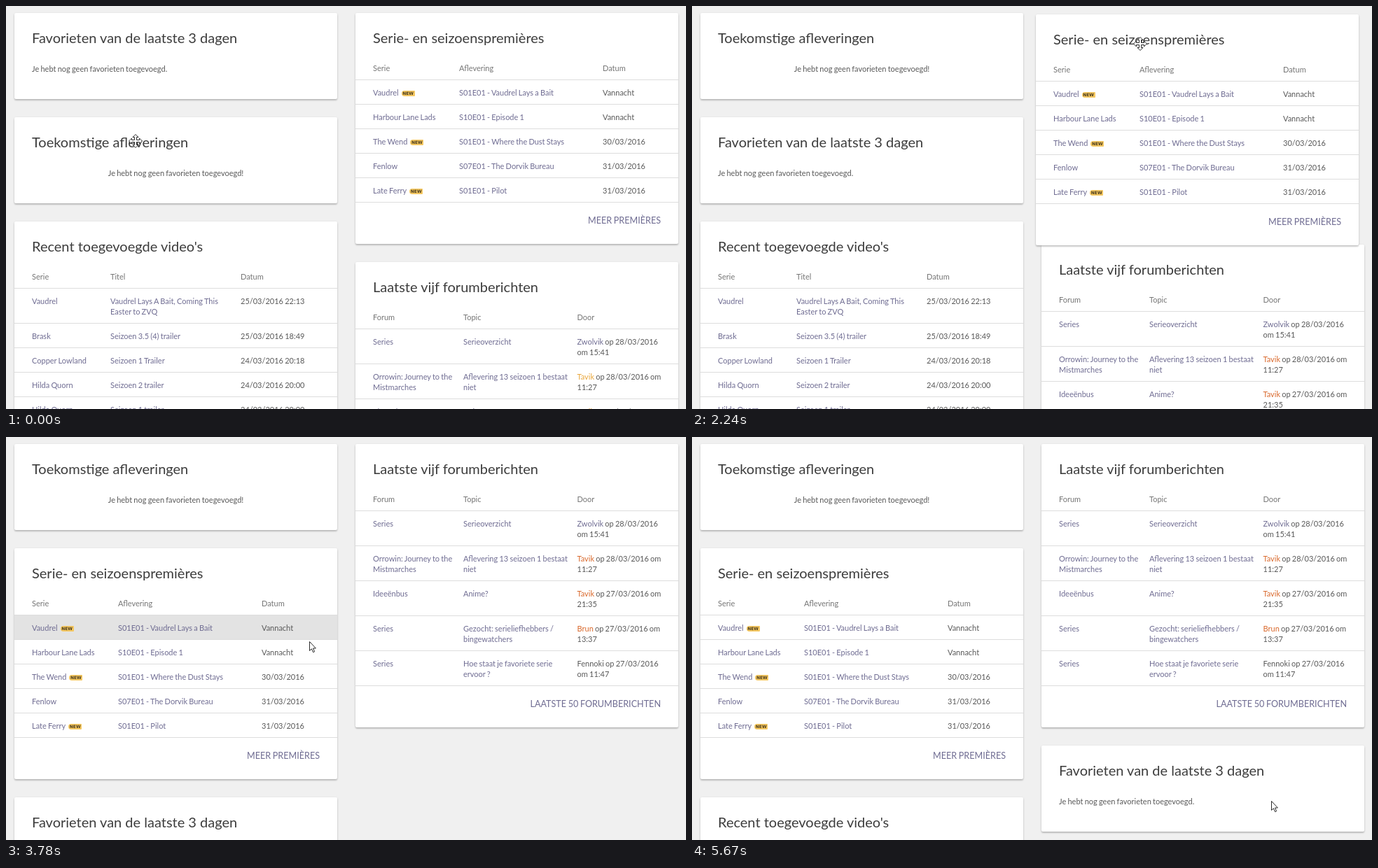
An HTML page that plays this animation: 971x576 px, repeating every 5740 ms.

```html
<!DOCTYPE html>
<html lang="nl">
<head>
<meta charset="utf-8">
<title>Widgets verslepen</title>
<style>
  html, body { margin: 0; width: 100%; height: 100%; overflow: hidden; background: #f0f0f0; }
  #stage {
    position: relative; width: 971px; height: 576px; overflow: hidden;
    font: 11px/15px Lato, sans-serif; word-spacing: -.6px; color: #595959; white-space: nowrap;
  }
  .card {
    position: absolute; left: 0; top: 0; width: 461px; box-sizing: border-box;
    background: #fff; border-radius: 2px;
    box-shadow: 0 1px 3px rgba(0,0,0,.17), 0 2px 2px rgba(0,0,0,.13);
  }
  .card.dragged { z-index: 1; }
  h2 {
    position: absolute; left: 25px; right: 25px; top: 23px; margin: 0;
    font-size: 20px; line-height: 24px; font-weight: 400; word-spacing: 0; color: #3d3d3d;
  }
  p { position: absolute; left: 25px; right: 25px; top: 72px; margin: 0; }
  p.center { text-align: center; }
  .table { padding-top: 71px; }
  .row, .head { display: grid; grid-template-columns: var(--cols); padding-left: 25px; }
  .head { height: 24px; color: #757575; }
  .row { padding-top: 10px; padding-bottom: 9px; border-top: 1px solid #ddd; }
  .row.hover { background: #e3e3e3; }
  .more {
    border-top: 1px solid #ddd; padding: 16px 25px 0; text-align: right;
    font-size: 12.6px; line-height: 19px;
  }
  a, .more { color: #6f6c92; }
  b { font-weight: 400; color: var(--accent); }
  i {
    display: inline-block; width: 19px; height: 8px; margin-left: 4px; vertical-align: 1px;
    background: #f5c862; border-radius: 4px 1px 1px 4px; color: #4a3b1c; text-align: center;
    font: bold 6px/8px "DejaVu Sans", sans-serif;
  }
  svg { position: absolute; left: 0; top: 0; z-index: 2; overflow: visible; }
  svg path { fill: #fff; stroke: #2b2b2b; stroke-width: 1; }
</style>
</head>
<body>
<div id="stage">
  <svg id="cursor" width="1" height="1">
    <path id="grip" d="M0-9.5 4-5.5H1.5V-1.5H5.5V-4L9.5 0 5.5 4V1.5H1.5V5.5H4L0 9.5-4 5.5H-1.5V1.5H-5.5V4L-9.5 0-5.5-4V-1.5H-1.5V-5.5H-4Z"/>
    <path id="arrow" d="M.5.5V13.5L3.4 10.8 5.6 15.7 7.6 14.8 5.5 10H9.4Z"/>
  </svg>
</div>
<script>
const byId = id => document.getElementById(id);
const stage = byId('stage'), cursor = byId('cursor'), grip = byId('grip'), arrow = byId('arrow');

const LOOP = 5740, TICK = 70;
const LAG = TICK / 2; // the page trails the pointer by this much
const GAP = 26, TOP = 10, COLUMN_X = [12, 499];

const link = text => `<a>${text}</a>`;
const fresh = text => link(text) + '<i>NEW</i>';

function addCard(height, title, body) {
  const el = document.createElement('section');
  el.className = 'card';
  el.style.height = height + 'px';
  el.innerHTML = `<h2>${title}</h2>${body}`;
  stage.append(el);
  return { el, height };
}

function table(cols, head, rows, more) {
  const line = (kind, cells) =>
    `<div class="${kind}">${cells.map(c => `<span>${c}</span>`).join('')}</div>`;
  return `<div class="table" style="--cols:${cols}">${line('head', head)}` +
    rows.map(r => line('row', r)).join('') +
    (more ? `<div class="more">${more}</div>` : '') + '</div>';
}

const premiere = (name, episode, date) => [name, link(episode), date];
const video = (name, title, date) => [link(name), link(title), date];
const post = (forum, topic, by) => [link(forum), link(topic), by];

const cards = {
  favourites: addCard(123, 'Favorieten van de laatste 3 dagen',
    '<p>Je hebt nog geen favorieten toegevoegd.</p>'),
  upcoming: addCard(123, 'Toekomstige afleveringen',
    '<p class="center">Je hebt nog geen favorieten toegevoegd!</p>'),
  videos: addCard(405, "Recent toegevoegde video's",
    table('112px 186px 1fr', ['Serie', 'Titel', 'Datum'], [
      video('Vaudrel', 'Vaudrel Lays A Bait, Coming This<br>Easter to ZVQ', '25/03/2016 22:13'),
      video('Brask', 'Seizoen 3.5 (4) trailer', '25/03/2016 18:49'),
      video('Copper Lowland', 'Seizoen 1 Trailer', '24/03/2016 20:18'),
      video('Hilda Quorn', 'Seizoen 2 trailer', '24/03/2016 20:00'),
      video('Hilda Quorn', 'Seizoen 1 trailer', '24/03/2016 20:00'),
      ['&nbsp;']
    ])),
  premieres: addCard(330, 'Serie- en seizoenspremières',
    table('123px 205px 1fr', ['Serie', 'Aflevering', 'Datum'], [
      premiere(fresh('Vaudrel'), 'S01E01 - Vaudrel Lays a Bait', 'Vannacht'),
      premiere(link('Harbour Lane Lads'), 'S10E01 - Episode 1', 'Vannacht'),
      premiere(fresh('The Wend'), 'S01E01 - Where the Dust Stays', '30/03/2016'),
      premiere(link('Fenlow'), 'S07E01 - The Dorvik Bureau', '31/03/2016'),
      premiere(fresh('Late Ferry'), 'S01E01 - Pilot', '31/03/2016')
    ], 'MEER PREMIÈRES')),
  forum: addCard(405, 'Laatste vijf forumberichten',
    table('129px 162.5px 1fr', ['Forum', 'Topic', 'Door'], [
      post('Series', 'Serieoverzicht', link('Zwolvik') + ' op 28/03/2016<br>om 15:41'),
      post('Orrowin: Journey to the<br>Mistmarches', 'Aflevering 13 seizoen 1 bestaat<br>niet',
        '<b>Tavik</b> op 28/03/2016 om<br>11:27'),
      post('Ideeënbus', 'Anime?', '<b>Tavik</b> op 27/03/2016 om<br>21:35'),
      post('Series', 'Gezocht: serieliefhebbers /<br>bingewatchers',
        '<b>Brun</b> op 27/03/2016 om<br>13:37'),
      post('Series', 'Hoe staat je favoriete serie<br>ervoor ?', 'Fennoki op 27/03/2016<br>om 11:47')
    ], 'LAATSTE 50 FORUMBERICHTEN'))
};
const rows = [...stage.querySelectorAll('.row')];
const titles = [...stage.querySelectorAll('h2')];

// Each drag goes from its slot past one point to its new slot;
// afterwards the free pointer glides to the listed stops.
const drags = [
  { card: 'upcoming', column: 0, index: 0, hold: [173, 34], via: [22, 10],
    start: 385, reach: 1120, swap: 1260, drop: 1540,
    stops: [{ leave: 1540, arrive: 2030, at: [671, 45] }] },
  { card: 'premieres', column: 0, index: 1, hold: [172, 35], via: [143, 112],
    start: 2205, reach: 2590, swap: 2450, drop: 2940,
    stops: [{ leave: 2940, arrive: 3220, at: [545, 140] },
            { leave: 3535, arrive: 4130, at: [242, 553] }] },
  { card: 'favourites', column: 1, index: 1, hold: [230, 38], via: [392, 434],
    start: 4165, reach: 4760, swap: 4550, drop: 5110,
    stops: [{ leave: 5110, arrive: 5390, at: [688, 484] },
            { leave: 5495, arrive: 5670, at: [827, 520] }] }
];

const add = (a, b) => a.map((v, i) => v + b[i]);
const mix = (a, b, k) => a.map((v, i) => v + (b[i] - v) * k);
function ease(from, to, t) {
  const k = Math.min(1, Math.max(0, (t - from) / (to - from)));
  return k * k * (3 - 2 * k);
}

function columnsAt(t) {
  const columns = [['favourites', 'upcoming', 'videos'], ['premieres', 'forum']];
  for (const d of drags.filter(d => d.swap <= t)) {
    for (const names of columns) {
      if (names.includes(d.card)) names.splice(names.indexOf(d.card), 1);
    }
    columns[d.column].splice(d.index, 0, d.card);
  }
  return columns;
}

// The placeholder of a dragged card has almost no margin.
function slotsAt(t, dragged) {
  const slots = {};
  columnsAt(t).forEach((names, column) => {
    let y = TOP;
    for (const name of names) {
      slots[name] = [COLUMN_X[column], y];
      y += cards[name].height + (name === dragged ? 1 : GAP);
    }
  });
  return slots;
}

for (const d of drags) {
  d.home = slotsAt(d.start)[d.card];
  d.target = slotsAt(d.drop)[d.card];
}

const dragged = (d, t) =>
  mix(mix(d.home, d.via, ease(d.start, d.reach, t)), d.target, ease(d.reach + TICK, d.drop, t));

function pointerAt(t) {
  let pos = add(drags[0].home, drags[0].hold);
  for (const d of drags) {
    if (t < d.start) break;
    pos = add(dragged(d, t + LAG), d.hold);
    for (const s of d.stops) pos = mix(pos, s.at, ease(s.leave, s.arrive, t));
  }
  return pos;
}

function place(el, [x, y]) {
  el.style.transform = `translate(${Math.round(x)}px,${Math.round(y)}px)`;
}

function contains(el, [x, y]) {
  const r = el.getBoundingClientRect();
  return x >= r.left && x < r.right && y >= r.top && y < r.bottom;
}

function draw(t) {
  const drag = drags.find(d => t >= d.start && t < d.drop);
  const slots = slotsAt(t, drag?.card);
  for (const [name, { el }] of Object.entries(cards)) {
    const held = name === drag?.card;
    el.classList.toggle('dragged', held);
    place(el, held ? dragged(drag, t) : slots[name]);
  }

  const seen = pointerAt(t - LAG);
  const gripping = drag || titles.some(h => contains(h, seen));
  place(cursor, pointerAt(t));
  grip.style.display = gripping ? '' : 'none';
  arrow.style.display = gripping ? 'none' : '';
  for (const row of rows) row.classList.toggle('hover', !drag && contains(row, seen));
  stage.style.setProperty('--accent', t < drags[1].start ? '#e9a63a' : '#d9682b');
}

const start = performance.now();
let shown = -1;
function frame() {
  const t = Math.floor(((performance.now() - start) % LOOP) / TICK) * TICK;
  if (t !== shown) draw(shown = t);
  requestAnimationFrame(frame);
}
frame();
</script>
</body>
</html>
```
